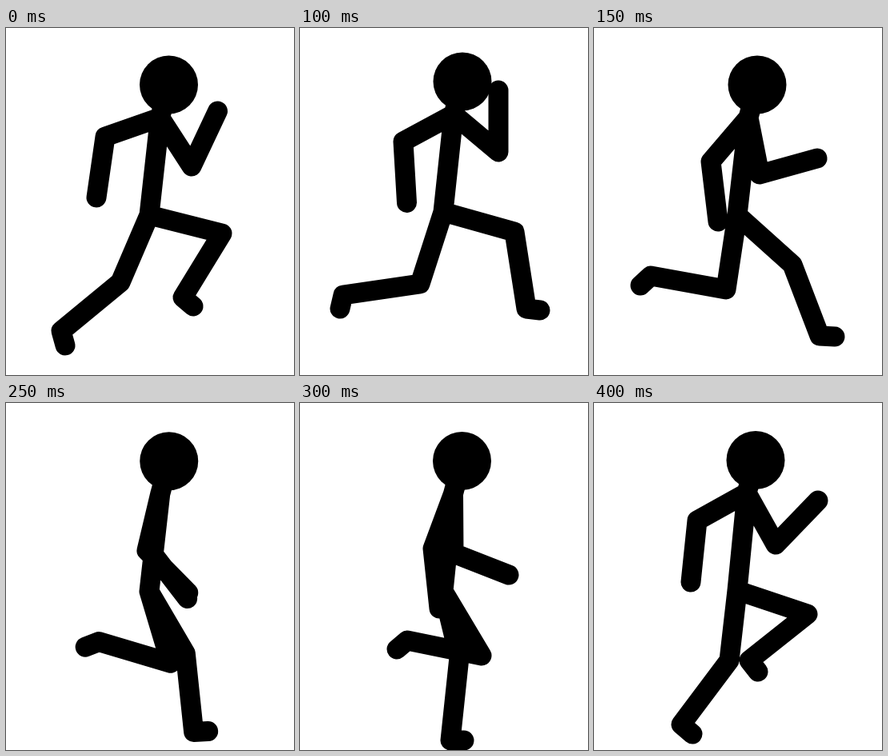
These frames come from a looping animation (360 by 434 pixels, 450 ms). An HTML page:

```html
<!DOCTYPE html>
<html lang="en">
<head>
<meta charset="utf-8">
<title>Running figure</title>
<style>
  html, body { margin: 0; width: 100%; height: 100%; overflow: hidden; background: #fff; }
  svg { display: block; width: 100%; height: 100%; }
  path { fill: none; stroke: #000; stroke-width: 25; stroke-linecap: round; stroke-linejoin: round; }
</style>
</head>
<body>
<svg viewBox="0 0 360 434">
  <circle id="head" r="36.5"/>
  <path id="limbs"/>
</svg>
<script>
const STEP = 50, STEPS = 9;

// Joints per key pose; arms run elbow-hand, legs run knee-ankle-toe.
const keys = [
  { at: 0, head: [203.5, 71],
    armA: [[232, 173], [264.5, 104]], armB: [[124, 136], [113, 212]],
    legA: [[270, 257], [221, 337], [234, 348]], legB: [[143, 318], [69, 379], [74, 397]] },
  { at: 2, head: [203, 67],
    armA: [[248, 155], [248, 78]], armB: [[129, 142], [133.5, 218.5]],
    legA: [[268, 255], [283, 351], [300, 353]], legB: [[150, 320], [54, 334], [50, 351]] },
  { at: 3, head: [204, 71],
    armA: [[207, 183], [279, 163]], armB: [[146, 167], [155, 242]],
    legA: [[248, 296], [282, 385], [301, 386]], legB: [[165, 327], [71, 310], [58, 322]] },
  { at: 4, head: [205, 73],
    armA: [[186, 186], [258, 195]], armB: [[173, 184], [181, 255]],
    legA: [[248, 300], [277, 389], [296, 387]], legB: [[183, 329], [97, 295], [78, 296]] },
  { at: 6, head: [202.5, 72.5],
    armA: [[166, 182], [174, 257]], armB: [[192, 188], [261, 215]],
    legA: [[199, 318], [188, 422], [205, 422]], legB: [[227, 316], [134, 297], [121, 308]] },
  { at: 8, head: [202, 71.5],
    armA: [[129, 147], [121, 224]], armB: [[227, 177], [280, 122]],
    legA: [[169, 322], [109, 402], [123, 414]], legB: [[267, 264], [194, 322], [205, 336]] }
];

const mix = (a, b, t) => a + (b - a) * t;
const neckOf = ([x, y]) => [x - 11, y + 41];
const hipOf = ([, y]) => [179, y + 163];

// Swings each bone about its joint, turning the short way round.
function swing(rootA, limbA, rootB, limbB, t) {
  let from = rootA, to = rootB;
  let joint = [mix(from[0], to[0], t), mix(from[1], to[1], t)];
  return limbA.map((a, i) => {
    const b = limbB[i];
    const p = [a[0] - from[0], a[1] - from[1]], q = [b[0] - to[0], b[1] - to[1]];
    const angle = Math.atan2(p[1], p[0]);
    let turn = Math.atan2(q[1], q[0]) - angle;
    turn = Math.atan2(Math.sin(turn), Math.cos(turn));
    const length = mix(Math.hypot(...p), Math.hypot(...q), t);
    const now = angle + turn * t;
    joint = [joint[0] + length * Math.cos(now), joint[1] + length * Math.sin(now)];
    [from, to] = [a, b];
    return joint;
  });
}

function poseAt(step) {
  const i = keys.findLastIndex(k => k.at <= step);
  const a = keys[i], b = keys[i + 1] || a;
  const t = a === b ? 0 : (step - a.at) / (b.at - a.at);
  const limb = (name, rootOf) => swing(rootOf(a.head), a[name], rootOf(b.head), b[name], t);
  const head = a.head.map((v, k) => mix(v, b.head[k], t));
  const neck = neckOf(head), hip = hipOf(head);
  const lines = [
    [head, neck, hip],
    [neck, ...limb("armA", neckOf)], [neck, ...limb("armB", neckOf)],
    [hip, ...limb("legA", hipOf)], [hip, ...limb("legB", hipOf)]
  ];
  return { head, d: lines.map(line => "M" + line.join("L")).join("") };
}

const poses = Array.from({ length: STEPS }, (_, step) => poseAt(step));
const headEl = document.getElementById("head");
const limbsEl = document.getElementById("limbs");

function draw(time) {
  const { head, d } = poses[Math.floor(time / STEP) % STEPS];
  headEl.setAttribute("cx", head[0]);
  headEl.setAttribute("cy", head[1]);
  limbsEl.setAttribute("d", d);
}

function tick(time) {
  draw(time);
  requestAnimationFrame(tick);
}
draw(0);
requestAnimationFrame(tick);
</script>
</body>
</html>
```
